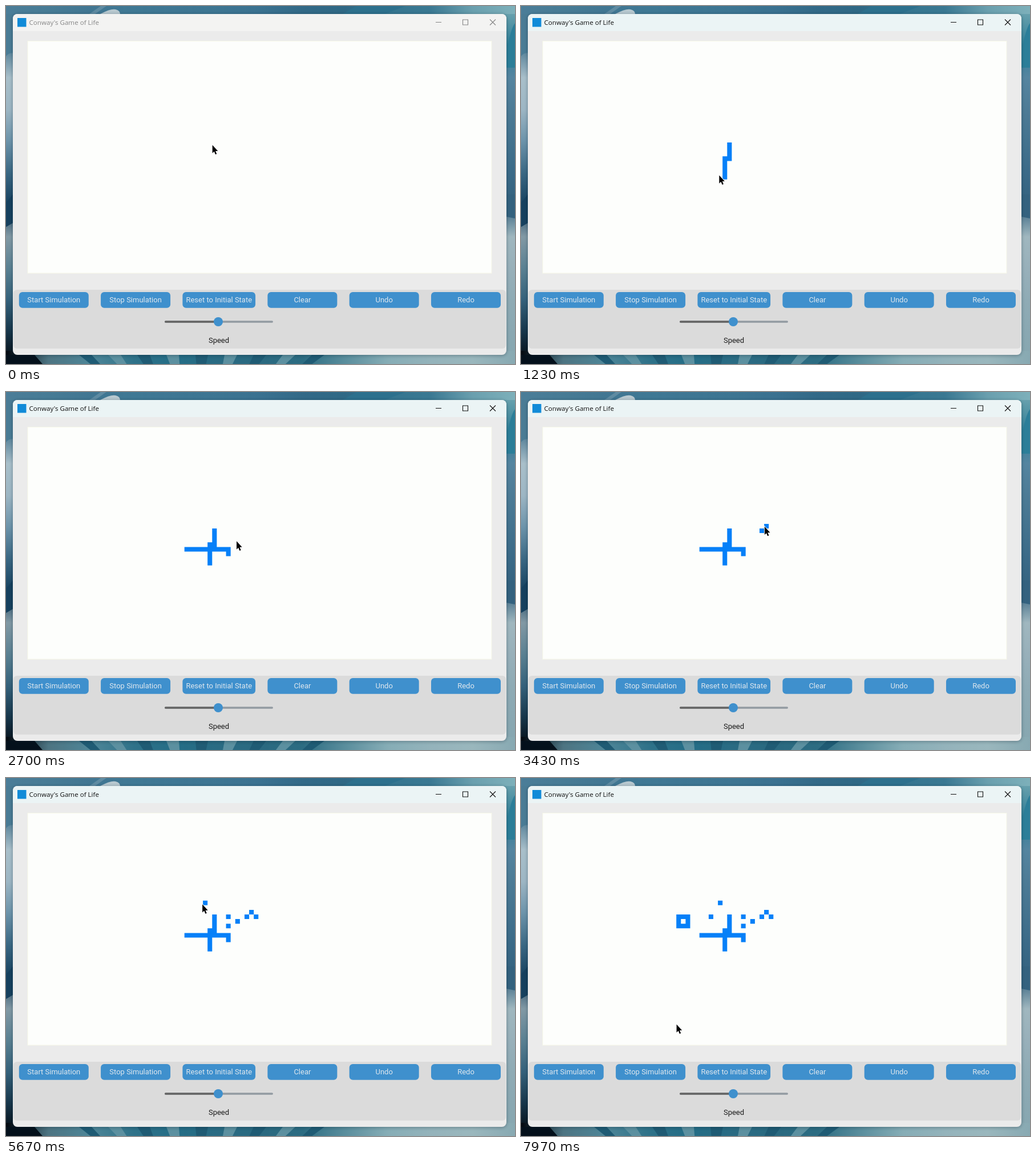
An HTML page with a canvas that plays this animation: 892x627 px, repeating every 8000 ms.

```html
<!DOCTYPE html>
<html lang="en">
<head>
<meta charset="utf-8">
<title>Game of Life</title>
<style>
html, body { margin: 0; width: 100%; height: 100%; overflow: hidden; }
canvas { display: block; }
</style>
</head>
<body>
<canvas id="stage" width="892" height="627"></canvas>
<script>
const ctx = document.getElementById('stage').getContext('2d');
const LOOP = 8000, FOCUS = 150;
const CELL = 8.1, LEFT = 37.3, TOP = 60.8;
const UI_FONT = '13px Roboto, sans-serif';

// A stroke holds the button down along cell corners, at an even pace
const stroke = (start, end, ...cells) => ({ start, end, cells });
const dots = [[47, 22], [48, 21], [49, 22], [45, 23], [43, 24], [43, 22], [38, 19], [36, 22]];
const strokes = [
  stroke(FOCUS, 1200, [40, 22], [40, 25], [39, 25], [39, 29]),
  stroke(1400, 2380, [34, 26], [43, 26], [43, 27]),
  ...dots.map((cell, i) => stroke(2955 + i * 445, 2965 + i * 445, cell)),
  stroke(6350, 7440, [31, 22], [29, 22], [29, 24], [31, 24], [31, 23]),
  stroke(7970, LOOP, [29, 45.2])
];

const mix = (a, b, k) => a.map((v, i) => v + (b[i] - v) * k);
const span = (a, b) => Math.hypot(b[0] - a[0], b[1] - a[1]);

function along(cells, k) {
  let left = k * cells.slice(1).reduce((sum, c, i) => sum + span(cells[i], c), 0);
  for (let i = 1; i < cells.length; i++) {
    const step = span(cells[i - 1], cells[i]);
    if (left <= step) return mix(cells[i - 1], cells[i], left / step);
    left -= step;
  }
  return cells[cells.length - 1];
}

function pointer(t) {
  const i = strokes.findIndex(s => t < s.end);
  const s = strokes[i], prev = strokes[i - 1];
  if (t >= s.start) return { at: along(s.cells, (t - s.start) / (s.end - s.start)), down: true };
  if (!prev) return { at: s.cells[0], down: false };
  const k = (t - prev.end) / (s.start - prev.end);
  return { at: mix(along(prev.cells, 1), s.cells[0], k), down: false };
}

// Every cell remembers when the held pointer first touched it
const born = new Map();
for (let t = 0; t < strokes.at(-1).start; t += 5) {
  const p = pointer(t);
  const key = p.at.map(Math.round).join();
  if (p.down && !born.has(key)) born.set(key, t);
}

function box(x, y, w, h, fill, r = 0) {
  ctx.fillStyle = fill;
  ctx.beginPath();
  ctx.roundRect(x, y, w, h, r);
  ctx.fill();
}

function shape(d, fill) {
  ctx.fillStyle = fill;
  ctx.fill(new Path2D(d));
}

function line(d, color, width) {
  ctx.strokeStyle = color;
  ctx.lineWidth = width;
  ctx.stroke(new Path2D(d));
}

function text(str, x, y, font, color, align) {
  ctx.font = font;
  ctx.fillStyle = color;
  ctx.textAlign = align;
  ctx.fillText(str, x, y);
}

// Evenly spaced colours along the longer side
function strip(x, y, w, h, colors) {
  const g = w > h ? ctx.createLinearGradient(x, 0, x + w, 0) : ctx.createLinearGradient(0, y, 0, y + h);
  colors.split(' ').forEach((c, i, all) => g.addColorStop(i / (all.length - 1), '#' + c));
  box(x, y, w, h, g);
}

function wallpaper() {
  strip(0, 0, 892, 20, '4b7d98 477b95 417692 3f7894 3e7693 3d7592 3a7190 326987 2f6885 357590 3a7892 6a9fae 7db0ba');
  shape('M146 14L166 0H176L156 14Z', '#5f8ba2');
  shape('M165 14Q184 4 192 6Q200 8 200 14Z', '#b9c9d0');
  shape('M590 14L614 0H700L664 14Z', '#2d708d');

  strip(0, 14, 20, 613, '4a7b95 4a7891 a9bfca 9db6c4 6c93aa 3a6783 16405e 8299a5 5a8092 34607a 163448 02060c');
  shape('M0 14H12V82Q4 82 0 88Z', '#4a7b95');
  shape('M0 345L12 330V380L0 387Z', '#16405e');

  strip(870, 14, 22, 613, '67a0ad 2f7f98 5585a0 4d7b96 44738f 3b6a88 34627f a0b7bf 98b0ba 8fabb5 8aa8b2 86a7b0');
  shape('M877 82Q884 40 892 30V108H877Z', '#2c7e99');
  shape('M877 330H892V372L877 369Z', '#34627f');

  strip(0, 604, 892, 23, '02070e 4d7482 4e8698 2f7289 246d86 2a6b83 2a6980 2c6c82 5a8e9d 86adb6 94b3bb 9ab7bd 88a9b2');
  shape('M0 611H50L64 627H0Z', '#04101b');
  for (let i = 0; i < 9; i++) {
    const x = 128 + i * 51, lean = (350 - x) * .09;
    shape(`M${x} 611h22L${x + 17 + lean} 627h-17Z`, i % 2 ? '#5c90a0' : '#1f5b74');
  }
}

function titleBar(active) {
  const ink = active ? '#101010' : '#868686';
  box(12, 14, 865, 30, active ? '#ebf4f5' : '#f3f3f2', [8, 8, 0, 0]);
  box(20, 21, 15.5, 15.5, '#118bd8');
  text("Conway's Game of Life", 40.5, 33, '11.6px "Open Sans", "Noto Sans", sans-serif', ink, 'left');
  line('M753 28.5h10', ink, 1);
  line('M800.5 24h9v9h-9Z', ink, 1.1);
  line('M848 23.5l10 10m-10 0l10-10', ink, 1.1);
}

function controls() {
  box(13, 497, 863, 103, '#dbdbdb', 6);
  ctx.font = UI_FONT;
  let x = 22.8;
  for (const label of ['Start Simulation', 'Stop Simulation', 'Reset to Initial State', 'Clear', 'Undo', 'Redo']) {
    const w = Math.max(122, ctx.measureText(label).width + 12);
    box(x, 501, w, 27.7, '#3f90cd', 6);
    text(label, x + w / 2, 519, UI_FONT, '#dfe7ee', 'center');
    x += w + 21.3;
  }
  box(278, 551.3, 190, 3.4, '#939ba2', 1.7);
  box(278, 551.3, 94, 3.4, '#666', 1.7);
  box(364, 545, 16, 16, '#3f90cd', 8);
  text('Speed', 373, 590, UI_FONT, '#1c1c1c', 'center');
}

function liveCells(t) {
  ctx.beginPath();
  born.forEach((at, key) => {
    const [c, r] = key.split(',');
    if (at <= t) ctx.rect(LEFT + c * CELL, TOP + r * CELL, CELL, CELL);
  });
  ctx.fillStyle = '#0680f8';
  ctx.fill();
}

function arrow([c, r]) {
  const d = 'M0 0V14.3L3.1 11.4L5.3 16.6L7.6 15.6L5.4 10.5H9.6Z';
  ctx.save();
  ctx.translate(LEFT + (c + .05) * CELL, TOP + (r + .55) * CELL);
  line(d, '#fff', 1.5);
  shape(d, '#000');
  ctx.restore();
}

function draw(t) {
  wallpaper();
  ctx.save();
  ctx.shadowColor = 'rgba(0,20,35,.35)';
  ctx.shadowBlur = 6;
  ctx.shadowOffsetY = 1;
  box(12, 14, 865, 597, '#ebebeb', 8);
  ctx.restore();
  titleBar(t >= FOCUS);
  box(37.5, 61, 814, 407.5, '#f6f7e8');
  box(38.5, 62, 812, 405.5, '#fdfefc');
  controls();
  liveCells(t);
  arrow(pointer(t).at);
}

const start = performance.now();
function tick() {
  draw((performance.now() - start) % LOOP);
  requestAnimationFrame(tick);
}
tick();
</script>
</body>
</html>
```
